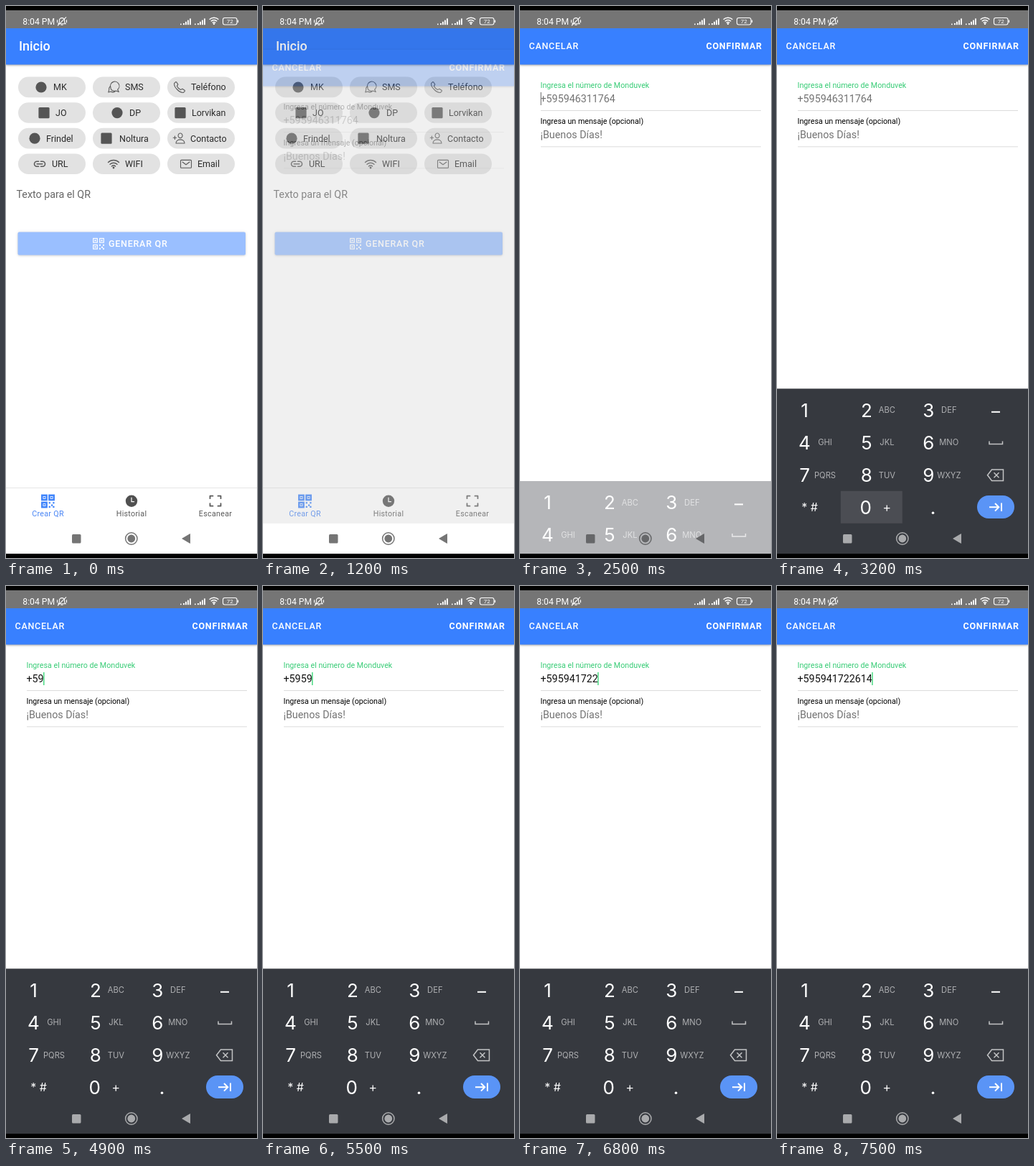
An HTML page that plays this animation: 350 px wide and 768 px high, repeating every 8000 ms.

```html
<!DOCTYPE html>
<html lang="es">
<head>
<meta charset="utf-8">
<style>
html, body { margin: 0; width: 100%; height: 100%; overflow: hidden; background: #000; }
svg { display: block; width: 100%; height: 100%; font-family: Roboto, sans-serif; }
.mid { text-anchor: middle; }
.btn { font-size: 12.5px; font-weight: 500; letter-spacing: .75px; fill: #fff; }
.field { font-size: 14.28px; fill: #737373; }
.label { font-size: 10.7px; }
.chip { font-size: 12.5px; fill: #2b2b2b; }
.tab { font-size: 10.7px; letter-spacing: .3px; text-anchor: middle; fill: #595959; }
.digit { font: 26px Inter, sans-serif; fill: #fff; text-anchor: middle; }
.letters { font: 11.2px Inter, sans-serif; fill: #fff; fill-opacity: .6; text-anchor: middle; }
.line { fill: none; stroke: #5a5a5a; stroke-width: 1.1; stroke-linecap: round; stroke-linejoin: round; }
.raised { filter: drop-shadow(0 1px 1px rgba(0, 0, 0, .25)) drop-shadow(0 .5px 2px rgba(0, 0, 0, .2)); }
</style>
</head>
<body>
<svg id="stage" viewBox="0 0 350 768">
  <g id="page"></g>
  <rect id="dim" y="31" width="350" height="689"/>
  <g id="modal"></g>
  <rect y="720" width="350" height="42" fill="#fff"/>
  <g id="keys"></g>
  <g id="nav"></g>
  <g id="status"></g>
</svg>
<script>
const $ = id => document.getElementById(id);
const text = (x, y, s, cls, extra = '') => `<text x="${x}" y="${y}" class="${cls}" ${extra}>${s}</text>`;
const rect = (x, y, w, h, fill, extra = '') =>
  `<rect x="${x}" y="${y}" width="${w}" height="${h}" fill="${fill}" ${extra}/>`;
const at = (x, y, s) => `<g transform="translate(${x} ${y})">${s}</g>`;
const line = (d, extra = '') => `<path class="line" d="${d}" ${extra}/>`;
const header = rect(0, 31, 350, 50.5, '#3880ff', 'class="raised"');

const dot = '<circle r="7.6" fill="#555"/>';
const box = rect(-7.6, -7.6, 15.2, 15.2, '#555', 'rx="1.5"');
const arcs = 'M-7.5-2.3A10.8 10.8 0 0 1 7.5-2.3M-5 .5A7.3 7.3 0 0 1 5 .5M-2.6 3.1A3.8 3.8 0 0 1 2.6 3.1';
const icons = {
  dot, box,
  chat: line('M-3.6 2.8L-4.2 0A6.2 6.2 0 1 1 5.6 3.2L7.3 6.6 3.2 5A6.2 6.2 0 0 1-3.6 2.8M-4.8-1.2A5 5 0 0 0-6.3 3.6L-7.2 7-3.8 6A5.6 5.6 0 0 0 2 6'),
  phone: line('M-5.6-7.2L-7.4-5.4C-8 0 0 8 5.4 7.4L7.3 5.6Q7.7 4.8 7 4.2L3.9 2.2 1.6 3.6Q-2 1.8-3.6-1.6L-2.2-3.9-4.2-7Q-5-7.7-5.6-7.2'),
  person: line('M2-7.2a3 3.3 0 1 0 .1 0M-4 6.8C-4 0 8 0 8 6.8ZM-7.8-1h4.4M-5.6-3.2v4.4'),
  link: line('M-1.5-3.5H-4A3.5 3.5 0 0 0-4 3.5H-1.5M1.5-3.5H4A3.5 3.5 0 0 1 4 3.5H1.5M-3.8 0H3.8', 'style="stroke-width:1.6"'),
  wifi: line(arcs, 'style="stroke-width:1.4"') + '<circle cy="5.2" r="1.4" fill="#555"/>',
  mail: line('M-6.5-5.4H6.5Q7.5-5.4 7.5-4.4V4.4Q7.5 5.4 6.5 5.4H-6.5Q-7.5 5.4-7.5 4.4V-4.4Q-7.5-5.4-6.5-5.4M-5-2.8L0 1 5-2.8')
};

function qrIcon(color, size, weight) {
  const finder = (x, y) => rect(x, y, 5.6, 5.6, 'none', `stroke="${color}" stroke-width="${weight}"`) +
    rect(x + 1.8, y + 1.8, 2, 2, color);
  const bits = [[1, 1], [4, 4], [1, 6], [6, 1], [6, 6]].map(([x, y]) => rect(x, y, 2, 2, color)).join('');
  return `<g transform="scale(${size / 16})">${finder(-7.3, -7.3)}${finder(1.7, -7.3)}${finder(-7.3, 1.7)}${bits}</g>`;
}

// icon, icon x, label x, label
const chips = [
  ['dot', 49, 66, 'MK'], ['chat', 150, 166, 'SMS'], ['phone', 242, 258, 'Teléfono'],
  ['box', 53, 69, 'JO'], ['dot', 155, 172, 'DP'], ['box', 243, 259, 'Lorvikan'],
  ['dot', 40, 56, 'Frindel'], ['box', 140, 158, 'Noltura'], ['person', 241, 257, 'Contacto'],
  ['link', 47, 64, 'URL'], ['wifi', 150, 166, 'WIFI'], ['mail', 251, 267, 'Email']
];

$('page').innerHTML = rect(0, 31, 350, 731, '#fff') + header +
  text(18, 62, 'Inicio', '', 'font-size="17.86" font-weight="500" fill="#fff"') +
  chips.map(([icon, ix, tx, label], i) => {
    const y = 98.6 + 35.6 * Math.floor(i / 3);
    return rect(17 + 104 * (i % 3), y, 94, 28.6, '#e2e2e2', 'rx="14.3"') +
      at(ix, y + 14.4, icons[icon]) + text(tx, y + 18.7, label, 'chip');
  }).join('') +
  text(14.5, 267, 'Texto para el QR', 'field', 'style="fill:#666"') +
  rect(16.5, 314.5, 317.5, 32, '#3880ff', 'rx="2" class="raised" opacity=".5"') +
  at(129, 330.7, qrIcon('#fff', 16, 1.2)) + text(143, 334.6, 'GENERAR QR', 'btn') +
  rect(0, 670, 350, 1, '#e6e6e6') +
  at(58.5, 689, qrIcon('#3f84fb', 18, 2.2)) +
  at(175, 688.7, '<circle r="8.2" fill="#505050"/><path d="M0-5V1H4" fill="none" stroke="#fff" stroke-width="1.2"/>') +
  at(292, 688.7, line('M-7.5-3.5V-7H-3.5M3.5-7H7.5V-3.5M7.5 3.5V7H3.5M-3.5 7H-7.5V3.5', 'style="stroke-width:1.8"')) +
  text(58.5, 710, 'Crear QR', 'tab', 'style="fill:#4a86f5"') +
  text(175, 710, 'Historial', 'tab') + text(292, 710, 'Escanear', 'tab');

$('modal').innerHTML = rect(0, 31, 350, 731, '#fff') + header +
  text(12.5, 60.3, 'CANCELAR', 'btn') + text(259.5, 60.3, 'CONFIRMAR', 'btn', 'style="font-weight:700"') +
  text(28.5, 113.7, 'Ingresa el número de Monduvek', 'label', 'id="label"') +
  text(28.5, 133.7, '', 'field', 'id="number"') + rect(29, 145, 307, 1, '#dcdcdc') +
  text(28.5, 164, 'Ingresa un mensaje (opcional)', 'label') +
  text(28.5, 184.3, '¡Buenos Días!', 'field') + rect(29, 195.3, 307, 1, '#dcdcdc') +
  rect(29, 120, 1.3, 18, '#2dd36f', 'id="caret"');

const rowY = [562, 607.3, 652.4, 697.6];
const letters = ['', 'ABC', 'DEF', 'GHI', 'JKL', 'MNO', 'PQRS', 'TUV', 'WXYZ'];
const white = 'fill="none" stroke="#fff" stroke-width="2"';
const pale = 'fill="none" stroke="#fff" stroke-opacity=".7" stroke-width="1.5"';
$('keys').innerHTML = `<g id="board">${rect(0, 532.4, 350, 240, '#36393f')}</g>` +
  rect(0, 0, 86, 45, '#4b4d53', 'id="press"') +
  letters.map((s, i) => {
    const x = 86.4 * (i % 3), y = rowY[Math.floor(i / 3)];
    return text(38.5 + x, y + 9.5, i + 1, 'digit') + text(67 + x, y + 4.1, s, 'letters');
  }).join('') +
  text(45.5, 703, '* #', 'digit', 'style="font-size:16px"') + text(123.7, 707.1, 0, 'digit') +
  `<path d="M149 698.6H157.4M153.2 694.4V702.8" ${white} style="stroke-width:1.3"/>` +
  '<circle cx="217.5" cy="705.3" r="1.8" fill="#fff"/>' +
  `<path d="M299 564.8H311" ${white}/><path d="M296 605.5V609.5H314.5V605.5" ${pale}/>` +
  `<path d="M299.5 645H315.5V660.5H299.5L293.5 652.7ZM302.5 649.3L309.5 656.3M309.5 649.3L302.5 656.3" ${pale}/>` +
  rect(279, 681, 52, 32, '#5a94f6', 'rx="16"') +
  `<path d="M296 697.3H309M304 692L309.3 697.3 304 702.6M313 691.5V703" ${white}/>`;

$('nav').innerHTML = rect(92, 735, 12.5, 12.5, 'currentColor', 'rx="1.5"') +
  '<g transform="translate(174.8 741)"><circle r="8.2" fill="none" stroke="currentColor" stroke-width="1.5"/><circle r="5.4" fill="currentColor"/></g>' +
  '<path d="M245 741L257 734V748Z" fill="currentColor"/>';

const signal = x => [0, 1, 2, 3].map(i => rect(x + 4 + i * 3, 24 - 2.2 * i, 1.9, 2.2 + 2.2 * i, '#fff')).join('') +
  rect(x, 24.6, 1.6, 1.6, '#fff');
const lit = 'fill="none" stroke="#fff" stroke-width="1.1"';
$('status').innerHTML = rect(0, 0, 350, 6, '#000') + rect(0, 762, 350, 6, '#000') + rect(0, 6, 350, 25, '#757575') +
  text(23.3, 26, '8:04 PM', '', 'font-size="12.2" fill="#fff"') +
  at(78, 21.3, `<path d="M-5 3.5H5L3.7 1.5V-1A3.7 3.7 0 0 0-3.7-1V1.5ZM-1.5 5H1.5M-6 6L6-6M-6.5-2V2M6.5-2V2" ${lit}/>`) +
  signal(243) + signal(263) +
  at(290, 20.8, `<path d="${arcs}" transform="scale(.85)" ${lit} style="stroke-width:1.6"/><circle cy="4" r="1.3" fill="#fff"/>`) +
  rect(302.5, 16.5, 19.5, 9.5, 'none', 'rx="2.5" stroke="#fff" stroke-width="1.1"') + rect(322.8, 19.5, 1.3, 3.5, '#fff') +
  text(312.2, 24.2, '72', 'mid', 'font-size="8" fill="#fff"');

const LOOP = 8000, FOCUS = 2300, PLUS = 3500;
const digits = '595941722614';
const typedAt = [4800, 4900, 5100, 5500, 5900, 6100, 6300, 6600, 6800, 7100, 7300, 7500];
const clamp = v => Math.max(0, Math.min(1, v));
const show = (id, on) => $(id).setAttribute('visibility', on ? 'inherit' : 'hidden');

function pressedKey(t) {
  if (t >= 3200 && t < PLUS) return '0';
  return digits[typedAt.findIndex(end => t >= end - 100 && t < end)];
}

function draw(t) {
  const open = 1 - (1 - clamp((t - 1170) / 330)) ** 3;
  $('dim').setAttribute('opacity', .32 * open);
  $('modal').setAttribute('opacity', open);
  $('modal').setAttribute('transform', `translate(0 ${40 * (1 - open)})`);

  // text field
  const typing = t >= PLUS;
  const number = $('number');
  const count = typedAt.filter(end => t >= end).length;
  number.textContent = typing ? '+' + digits.slice(0, count) : '+595946311764';
  number.style.fill = typing ? '#111' : '#737373';
  $('label').style.fill = t >= FOCUS ? '#38cc76' : '#111';
  $('caret').setAttribute('x', typing ? 28 + number.getComputedTextLength() : 28.6);
  $('caret').setAttribute('fill', typing ? '#2dd36f' : '#858585');
  show('caret', (t >= FOCUS && t < 3000) || (typing && !(t >= 4000 && t < 4500)));

  // keyboard slides up while its panel fades in
  const u = clamp((t - 2385) / 315);
  const rise = 1 - (1 - u) ** 1.28;
  show('keys', u > 0);
  $('keys').setAttribute('transform', `translate(0 ${230 * (1 - rise)})`);
  $('board').setAttribute('opacity', u);
  $('nav').setAttribute('color', u === 0 ? '#757575' : u < .5 ? '#666769' : '#a9aaac');

  const key = pressedKey(t);
  show('press', key !== undefined);
  if (key !== undefined) {
    const i = key === '0' ? 10 : key - 1;
    $('press').setAttribute('x', 2.4 + 86.4 * (i % 3));
    $('press').setAttribute('y', rowY[Math.floor(i / 3)] - 22.8);
  }
}

// the screen refreshes ten times a second
const start = performance.now();
function tick() {
  const t = (performance.now() - start) % LOOP;
  draw(Math.floor(t / 100) * 100);
  requestAnimationFrame(tick);
}
draw(0);
tick();
</script>
</body>
</html>
```
